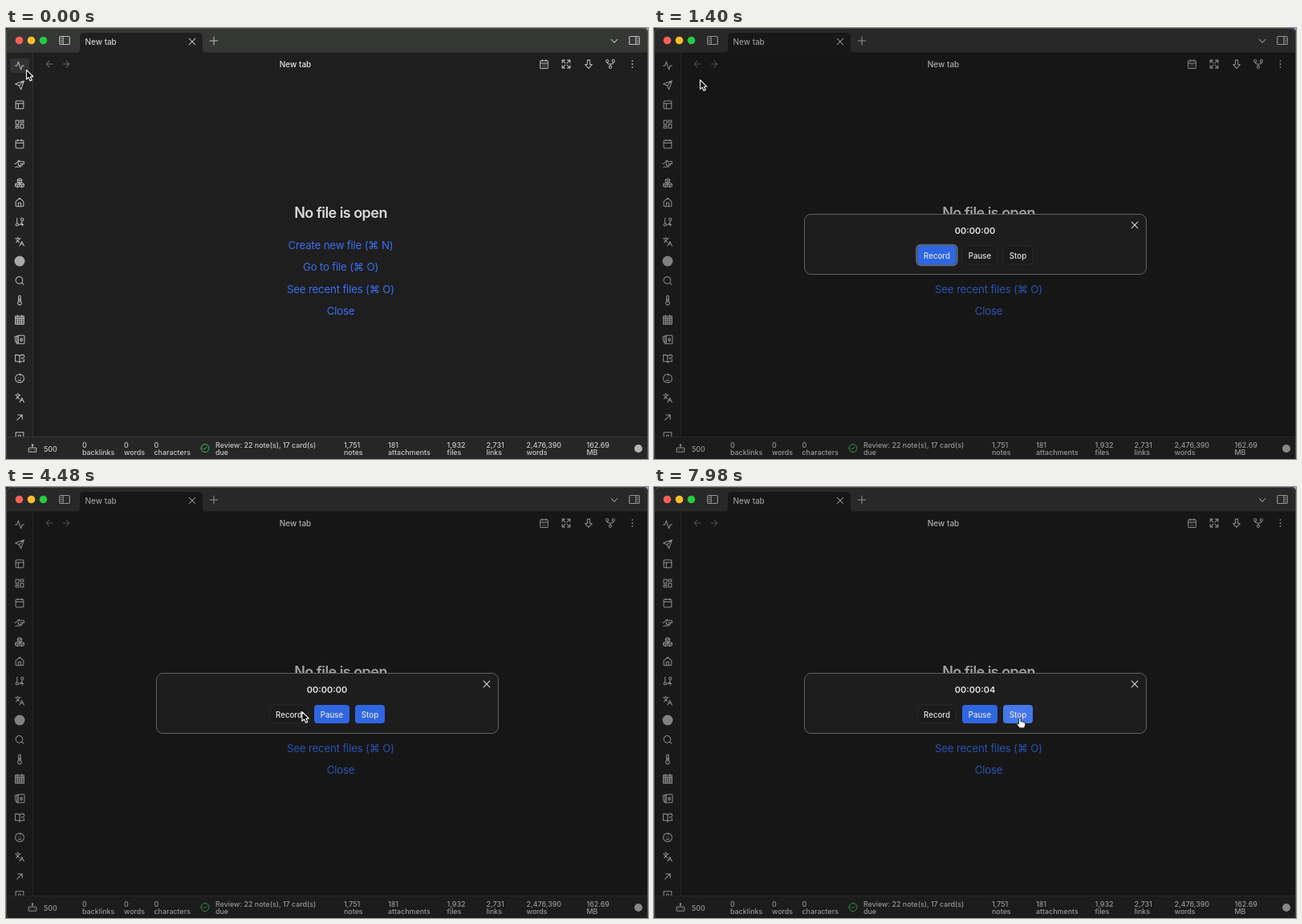
Animation of 800 by 538 pixels, one loop 8000 ms. Source, as an HTML page:

```html
<!DOCTYPE html>
<html lang="en">
<head>
<meta charset="utf-8">
<style>
  html, body { margin: 0; width: 800px; height: 538px; overflow: hidden; background: #1e1e1e; }
  svg { display: block; }
  text { font-family: Inter, "Noto Sans", sans-serif; font-size: 8.9px; font-weight: 500; fill: #c8c8c8; white-space: pre; }
  .tab { font-size: 10px; font-weight: 400; fill: #e6e6e6; }
  .title { font-weight: 500; }
  .mid { text-anchor: middle; }
  .heading { font-size: 18px; font-weight: 600; letter-spacing: -.03em; fill: #dadada; }
  .link { font-size: 13.3px; font-weight: 400; letter-spacing: -.015em; fill: #3b6ff0; }
  .timer { font-size: 11px; font-weight: 600; fill: #e4e4e4; }
  .label { font-size: 9.7px; fill: #e4e4e4; }
  .icon { fill: none; stroke: #bcbcbc; stroke-width: 1.9; stroke-linecap: round; stroke-linejoin: round; }
</style>
</head>
<body>
<svg id="stage" width="800" height="538" viewBox="0 0 800 538"></svg>
<script>
const LOOP = 8000, OPEN = 630, STARTED = 3850;
const TICKS = [4880, 5880, 6860, 7980];

const circle = (x, y, r) => `M${x - r} ${y}a${r} ${r} 0 1 0 ${2 * r} 0a${r} ${r} 0 1 0 ${-2 * r} 0`;
const calendar = 'M5 4h14q2 0 2 2v14q0 2-2 2H5q-2 0-2-2V6q0-2 2-2zM16 2v4M8 2v4M3 10h18';
const days = calendar + 'M8 14h.1M12 14h.1M16 14h.1M8 18h.1M12 18h.1M16 18h.1';
const languages = 'm5 8 6 6M4 14l6-6 2-3M2 5h12M7 2h1M22 22l-5-10-5 10M14 18h6';
const panel = 'M4 4h16q2 0 2 2v12q0 2-2 2H4q-2 0-2-2V6q0-2 2-2z';
const hexagon = (x, y) => `M${x} ${y - 5}l5 2.5v5l-5 2.5-5-2.5v-5zM${x - 5} ${y - 2.5}l5 2.5 5-2.5M${x} ${y}v5`;

// Paths on a 24 unit grid; the empty slot holds a plain circle.
const sidebar = [
  'M22 12h-4l-3 9L9 3l-3 9H2',
  'M22 2l-7 20-4-9-9-4zM22 2 11 13',
  'M5 3h14q2 0 2 2v14q0 2-2 2H5q-2 0-2-2V5q0-2 2-2zM3 9h18M9 21V9',
  'M3 3h7v9H3zM14 3h7v5h-7zM14 12h7v9h-7zM3 16h7v5H3z',
  calendar,
  'M1 13l3-1 5-6q3-1 3 2h10v5h-8M12 8h-3M18 13v4h-5M14 17v3H6l-4 1M9 11v5h4',
  hexagon(12, 7) + hexagon(7, 17) + hexagon(17, 17),
  'M3 10l9-8 9 8v9q0 2-2 2H5q-2 0-2-2zM9 21v-8h6v8',
  'M6 3v12' + circle(6, 18, 3) + circle(18, 6, 3) + 'M18 9a9 9 0 0 1-9 9M15 18h6M18 15v6',
  languages,
  '',
  circle(11, 11, 8) + 'M21 21l-4.3-4.3',
  'M14.5 4v10.5a4.5 4.5 0 1 1-5 0V4a2.5 2.5 0 0 1 5 0zM12 8v9',
  'M2 4h20v18H2zM7 1v4M17 1v4M2 8h20M2 9h20M2 13h20M2 17.5h20M7 9v13M12 9v13M17 9v13',
  'M9 3h12q2 0 2 2v15q0 2-2 2H9zM9 22H6V4h3M5 20l-2-1L1 6l4-1M16 9l3 4-3 4-3-4z',
  'M12 21V7a4 4 0 0 0-4-4H2v15h7a3 3 0 0 1 3 3 3 3 0 0 1 3-3h7v-5M12 7a4 4 0 0 1 4-4h6v2M16 10l2 2 5-5',
  circle(12, 12, 10) + 'M9 11h.1M15 11h.1M9 16q3 2 6 0M12 2q3 2 1 4',
  languages,
  'M6 18 18 6M8 6h10v10',
  'M3 1h18v20H3z' + circle(12, 10, 3)
];

const icon = (x, y, d, size = 13, attrs = '') =>
  `<path class="icon" d="${d}" transform="translate(${x} ${y}) scale(${size / 24}) translate(-12 -12)" ${attrs}/>`;
const text = (x, y, s, cls = '', id = '') => `<text x="${x}" y="${y}" class="${cls}" id="${id}">${s}</text>`;
const rect = (x, y, w, h, fill, attrs = '') =>
  `<rect x="${x}" y="${y}" width="${w}" height="${h}" fill="${fill}" ${attrs}/>`;
const dot = (x, y, r, fill) => `<circle cx="${x}" cy="${y}" r="${r}" fill="${fill}"/>`;

const links = ['Create new file (⌘ N)', 'Go to file (⌘ O)', 'See recent files (⌘ O)', 'Close'];
const stats = [[95, '0', 'backlinks'], [147, '0', 'words'], [184.5, '0', 'characters'],
  [261, 'Review: 22 note(s), 17 card(s)', 'due'], [421, '1,751', 'notes'], [476, '181', 'attachments'],
  [549.5, '1,932', 'files'], [598.5, '2,731', 'links'], [648.5, '2,476,390', 'words'], [723.5, '162.69', 'MB']];
const buttons = [
  { name: 'Record', x: 329, w: 47 },
  { name: 'Pause', x: 384, w: 44 },
  { name: 'Stop', x: 435, w: 37 }
];

const stage = document.getElementById('stage');
stage.innerHTML =
  rect(0, 0, 800, 538, '#1e1e1e') + rect(0, 0, 800, 30.5, '#353735') +
  '<path d="M87 31q5 0 5-5V11q0-5 5-5h143q5 0 5 5v15q0 5 5 5z" fill="#1f1f1f"/>' +
  rect(0, 31, 33, 480, '#222') + rect(33, 31, 1, 479, '#343434') +
  rect(5, 38, 24, 18, '#333', 'rx="3" id="hover"') +
  text(417, 237, 'No file is open', 'mid heading') +
  links.map((s, i) => text(417, 276 + 27.4 * i, s, 'mid link')).join('') +
  icon(54, 45, 'M19 12H5M12 5l-7 7 7 7', 13, 'opacity=".5"') +
  icon(75, 45, 'M5 12h14M12 5l7 7-7 7', 13, 'opacity=".5"') +
  rect(0, 510, 800, 28, '#262626') + rect(0, 510, 800, 1, '#343434') +
  rect(0, 0, 800, 538, '#000', 'id="shade" opacity=".27"') +
  '<g id="chrome">' +
  '<clipPath id="above"><rect width="33" height="510"/></clipPath><g clip-path="url(#above)">' +
  sidebar.map((d, i) => d ? icon(17, 47 + 24.4 * i, d) : dot(17, 291, 6.5, '#aaa')).join('') + '</g>' +
  icon(73, 15.5, panel + 'M9 4v16M5 8h1M5 12h1M5 16h1', 15) +
  icon(783, 15.5, panel + 'M15 4v16M18 8h1M18 12h1M18 16h1', 15) +
  icon(232, 17, 'M5 5l14 14M19 5 5 19') + icon(259, 16, 'M12 3v18M3 12h18') +
  icon(758, 16, 'M5 9l7 7 7-7') +
  icon(670.5, 45, days) +
  icon(698, 45, 'M15 3h6v6M9 21H3v-6M21 3l-7 7M3 21l7-7M9 3H3v6M3 3l7 7M21 15v6h-6M21 21l-7-7') +
  icon(726, 45, 'M9 3h6v10h5l-8 9-8-9h5z') +
  icon(753, 45, circle(12, 19, 3) + circle(5, 5, 3) + circle(19, 5, 3) + 'M5 8q0 4 4 4h6q4 0 4-4M12 12v4') +
  icon(780.5, 45, circle(12, 5, .7) + circle(12, 12, .7) + circle(12, 19, .7)) +
  text(98.5, 20.8, 'New tab', 'tab') + text(360.5, 48.5, 'New tab', 'tab title mid') +
  icon(33, 525, 'M5 10h14q2 0 2 2v6q0 2-2 2H5q-2 0-2-2v-6q0-2 2-2zM12 10V5M8 15h.1M16 15h.1' + circle(12, 4, 1.5)) +
  text(47, 528.5, '500') +
  stats.map(([x, top, bottom]) => text(x, 523.5, top) + text(x, 532.8, bottom)).join('') +
  icon(248, 524.5, circle(12, 12, 10) + 'M7.5 12l3 3 6-6', 12, 'style="stroke:#3fc463"') +
  dot(788, 525, 5, '#b4b4b4') + '</g>' +
  dot(16.5, 15.5, 4.8, '#fe5f57') + dot(31.5, 15.5, 4.8, '#febc2e') + dot(46.5, 15.5, 4.8, '#28c840') +
  rect(.5, .5, 799, 540, 'none', 'rx="7" stroke="#505050"') +
  '<path d="M796 0h4v4q-1-3-4-4z" fill="#9aa6cc"/>' +
  '<g id="modal">' + rect(187.5, 232.5, 426, 75, '#1d1d1d', 'rx="8" stroke="#616161"') +
  icon(599, 246, 'M5 5l14 14M19 5 5 19', 13, 'style="stroke:#ddd"') + text(400, 257, '', 'mid timer', 'timer') +
  rect(327.5, 271, 50, 25, 'none', 'rx="5" stroke="#586482" stroke-width="2.5" id="focus"') +
  buttons.map(b => rect(b.x, 272, b.w, 23, '', `rx="4" id="${b.name}"`) +
    text(b.x + b.w / 2, 287.6, b.name, 'mid label')).join('') + '</g>' +
  '<circle id="ring" r="17" fill="#111" fill-opacity=".35" stroke="#28589f" stroke-width="2.2"/>' +
  '<path id="arrow" d="M.5.5v11.5l2.7-2.3 1.900 4.200 2.200-1-1.900-4 3.500-.2z" fill="#000" stroke="#fff" stroke-width="1.1" stroke-linejoin="round"/>' +
  '<path id="hand" d="M-1.300 1q1.200-1.500 2.300 0v3.500q1.300-.8 1.900.4 1.300-.6 1.800.6 1.500-.3 1.500 1.200 0 3-1.500 5h-5.200q-1.500-2.400-3.400-4.600 0-1.700 2.600.2z" fill="#fff" stroke="#111" stroke-width=".8" stroke-linejoin="round"/>';

const el = Object.fromEntries([...stage.querySelectorAll('[id]')].filter(n => n.id).map(n => [n.id, n]));
const show = (node, on) => node.setAttribute('display', on ? 'inline' : 'none');
const ease = p => p < .5 ? 2 * p * p : 1 - 2 * (1 - p) ** 2;
const progress = (t, from, to) => ease(Math.min(1, Math.max(0, (t - from) / (to - from))));

function pointer(t) {
  const a = progress(t, 0, 350), b = progress(t, 910, 2960), c = progress(t, 4130, 5320);
  return [25 - 6 * a + 331 * b + 106 * c, 52 - 5 * a + 233 * b ** 1.2 + 8 * c ** 2];
}

function draw(t) {
  const open = t >= OPEN, started = t >= STARTED;
  const [x, y] = pointer(t);
  show(el.shade, open);
  show(el.modal, open);
  show(el.hover, !open);
  show(el.focus, !started);
  el.chrome.setAttribute('opacity', open ? .72 : 1);

  const seconds = TICKS.filter(tick => t >= tick).length;
  el.timer.textContent = '00:00:0' + seconds;

  let over = false;
  for (const { name, x: left, w } of buttons) {
    const enabled = (name === 'Record') !== started;
    const hovered = enabled && open && x >= left && x <= left + w && y >= 272 && y <= 295;
    over ||= hovered;
    el[name].setAttribute('fill', hovered ? '#4478ec' : enabled ? '#2f67e2' : '#1b1b1b');
    el[name].setAttribute('stroke', enabled ? 'none' : '#282828');
  }

  const place = `translate(${x} ${y})`;
  el.arrow.setAttribute('transform', place);
  el.hand.setAttribute('transform', place + 'scale(1.1)');
  el.ring.setAttribute('transform', `translate(${x - .5} ${y + .8})`);
  show(el.arrow, !over);
  show(el.hand, over);
  show(el.ring, (t >= 490 && t < 840) || (t >= 3570 && t < 3990));
}

function frame() {
  draw(performance.now() % LOOP);
  requestAnimationFrame(frame);
}
frame();
</script>
</body>
</html>
```
